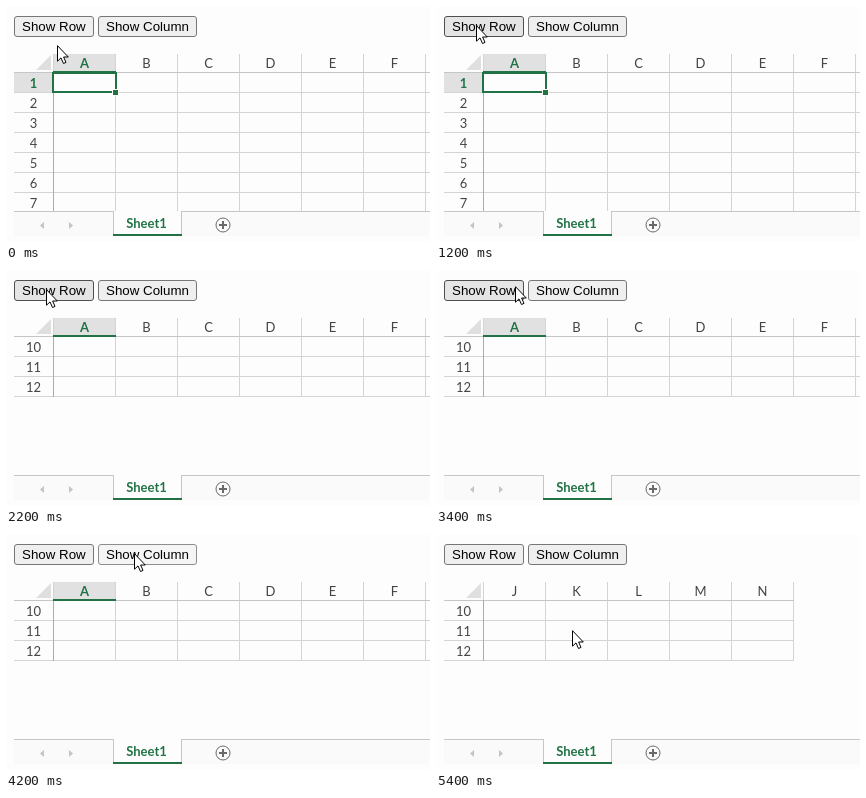
An HTML page for the animation above (5600 ms loop, 424x236 px).

```html
<!DOCTYPE html>
<html lang="en">
<head>
<meta charset="utf-8">
<title>Sheet scrolling</title>
<style>
  html, body { margin: 0; width: 100%; height: 100%; overflow: hidden; background: #fdfdfd; }
  svg { display: block; width: 424px; height: 236px; }
  .ui { font: 13.333px "Liberation Sans", Arial, sans-serif; }
  .sheet { font: 13px Lato, sans-serif; fill: #444; text-anchor: middle; }
  .sheet .active { font-weight: bold; fill: #217346; }
</style>
</head>
<body>
<svg id="stage" viewBox="0 0 424 236"></svg>
<script>
const LOOP = 5600;
const GREEN = '#217346';
const GRID = '#d4d4d4';
const COL_W = 62, ROW_H = 20, LEFT = 47, TOP = 66, BOTTOM = 205, RIGHT = 424;

// Each entry holds from its time until the next one.
const cursorSteps = [
  [0, [51, 39]], [800, [46, 19]], [1000, [40, 19]], [3400, [79, 16]],
  [3600, [112, 16]], [3800, [128, 19]], [5200, [131, 27]], [5400, [136, 96]]
];
const rowButtonSteps = [[0, 'idle'], [1000, 'hover'], [2000, 'down'], [2200, 'hover'], [3600, 'idle']];
const columnButtonSteps = [[0, 'idle'], [3600, 'hover'], [4200, 'down'], [4400, 'hover'], [5400, 'idle']];
const firstRowSteps = [[0, 1], [2200, 10]];
const firstColumnSteps = [[0, 0], [4400, 9]];

const buttonLooks = {
  idle: ['#efefef', '#767676'],
  hover: ['#e5e5e5', '#4f4f4f'],
  down: ['#f5f5f5', '#8d8d8d']
};

const at = (steps, t) => steps.filter(([start]) => start <= t).pop()[1];
const rect = (x, y, w, h, fill, extra = '') =>
  `<rect x="${x}" y="${y}" width="${w}" height="${h}" fill="${fill}" ${extra}/>`;
const text = (x, y, str, cls = '') => `<text x="${x}" y="${y}" class="${cls}">${str}</text>`;
const hLine = (x1, x2, y, color = GRID) => rect(x1, y, x2 - x1, 1, color);
const vLine = (x, y1, y2, color = GRID) => rect(x, y1, 1, y2 - y1, color);

function button(x, w, label, state) {
  const [fill, stroke] = buttonLooks[state];
  return rect(x + .5, 10.5, w - 1, 20, fill, `stroke="${stroke}" rx="2.5"`) +
    text(x + 8, 25, label, 'ui');
}

function grid(firstRow, firstCol) {
  const rows = Math.min(7, 13 - firstRow);
  const cols = Math.min(7, 14 - firstCol);
  const right = Math.min(RIGHT, LEFT + cols * COL_W + 1);
  const bottom = Math.min(BOTTOM, TOP + rows * ROW_H + 1);
  const colActive = firstCol === 0, rowActive = firstRow === 1;
  let out = '';

  if (colActive) out += rect(LEFT, 48, COL_W, 18, '#e1e1e1');
  if (rowActive) out += rect(8, TOP + 1, 39, ROW_H - 1, '#e1e1e1');
  out += '<path d="M45 49V64H30Z" fill="#dfdfdf"/>';

  for (let i = 0; i < cols; i++) {
    const x = LEFT + i * COL_W;
    const letter = String.fromCharCode(65 + firstCol + i);
    if (x + COL_W < RIGHT) {
      out += vLine(x + COL_W, 48, bottom);
      out += text(x + 31.5, 62, letter, colActive && i === 0 ? 'active' : '');
    }
  }
  for (let i = 0; i < rows; i++) {
    const y = TOP + i * ROW_H;
    if (y + ROW_H < BOTTOM) out += hLine(8, right, y + ROW_H);
    out += text(27.5, y + 16, firstRow + i, rowActive && i === 0 ? 'active' : '');
  }
  out += hLine(8, right, TOP, '#c6c6c6') + vLine(LEFT, 48, TOP) + vLine(LEFT, TOP, bottom, '#ababab');

  if (colActive) out += rect(LEFT, 65, COL_W + 1, 2, GREEN);
  if (colActive && rowActive) {
    out += rect(47, 67, 63, 19, 'none', `stroke="${GREEN}" stroke-width="2"`) +
      rect(106, 83, 7, 7, '#fdfdfd') + rect(107, 84, 5, 5, GREEN);
  }
  return `<g class="sheet">${out}</g>`;
}

function tabStrip() {
  return rect(8, 206, 416, 24, '#fafafa') + hLine(8, RIGHT, BOTTOM, '#c6c6c6') +
    rect(107, 205, 69, 24, '#fdfdfd') +
    vLine(107, 205, 229, '#c6c6c6') + vLine(175, 205, 229, '#c6c6c6') +
    rect(107, 228, 69, 2, GREEN) +
    `<g class="sheet">${text(140.5, 222, 'Sheet1', 'active')}</g>` +
    '<path d="M38 216V223L34 219.500ZM63 216V223L67 219.500Z" fill="#c4c4c4"/>' +
    '<circle cx="217" cy="219" r="7" fill="none" stroke="#6a6a6a"/>' +
    '<path d="M213 219H221M217 215V223" stroke="#6a6a6a" stroke-width="2"/>';
}

function cursor([x, y]) {
  return `<path transform="translate(${x} ${y})" fill="#fff" stroke="#000"
    d="M.5.7V16.200L4 12.900L6.500 18.500L9 17.400L6.600 12H11.300Z"/>`;
}

const stage = document.getElementById('stage');
const strip = tabStrip();

function draw(t) {
  stage.innerHTML =
    button(8, 80, 'Show Row', at(rowButtonSteps, t)) +
    button(92, 99, 'Show Column', at(columnButtonSteps, t)) +
    grid(at(firstRowSteps, t), at(firstColumnSteps, t)) +
    strip + cursor(at(cursorSteps, t));
}

const start = performance.now();
function tick() {
  draw((performance.now() - start) % LOOP);
  requestAnimationFrame(tick);
}
tick();
</script>
</body>
</html>
```
